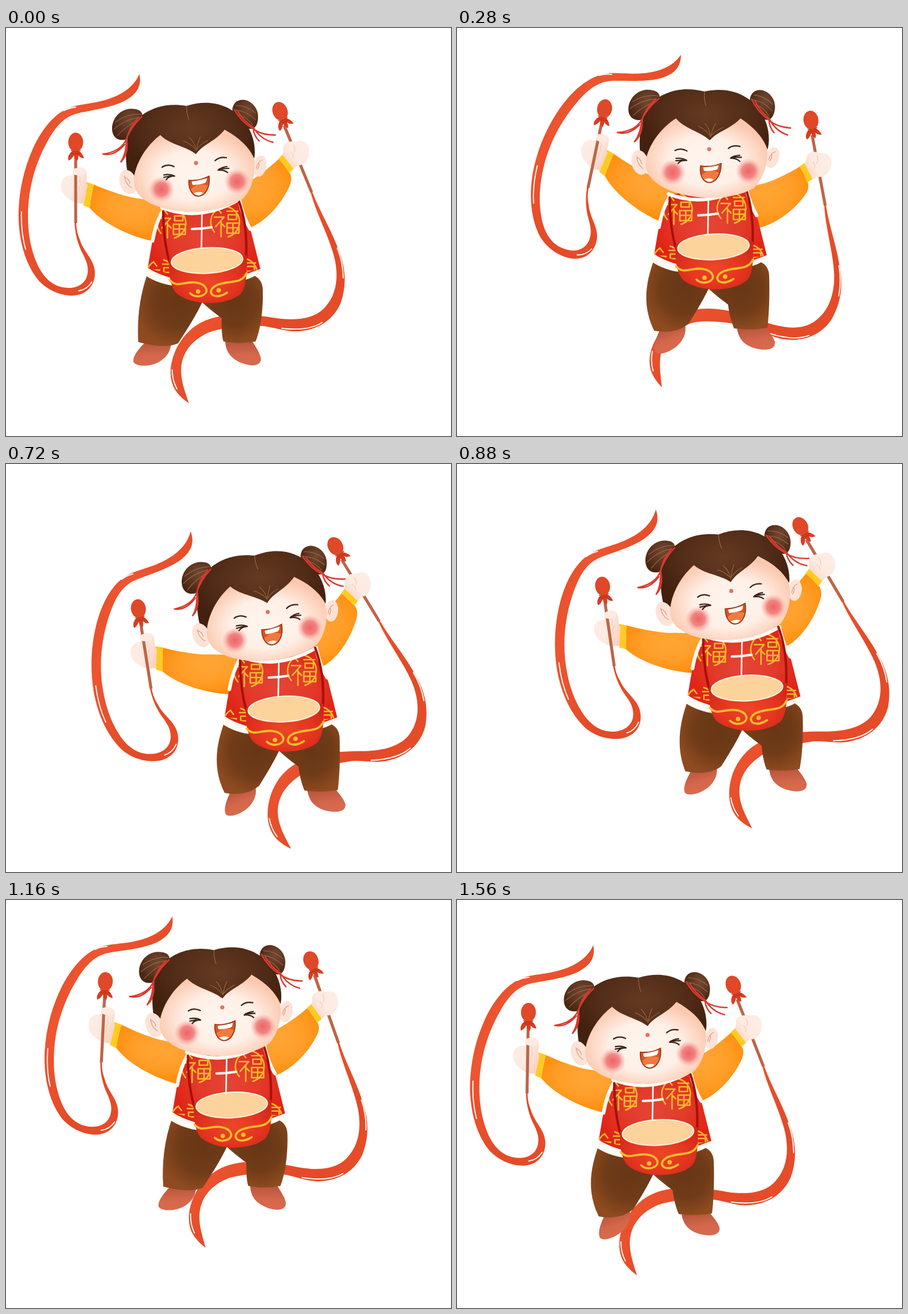
These frames come from a looping animation (747x686 px, 1600 ms). An HTML page:

```html
<!DOCTYPE html>
<html lang="zh">
<head>
<meta charset="utf-8">
<title>Drum dance</title>
<style>
html,body{margin:0;width:100%;height:100%;overflow:hidden;background:#fff}
svg{display:block;width:100%;height:100%}
.line{fill:none;stroke-linecap:round;stroke-linejoin:round}
.gold{stroke:#f6b62c;stroke-width:2.6}
.shine{stroke:#fff;stroke-width:1.8}
.bow{stroke:#d93a2e;stroke-width:2.4}
.strand{stroke:#a06c46;stroke-width:1}
.ink{stroke:#3d2013;stroke-width:2.2}
.trim{stroke:#fffaf3;stroke-width:6}
</style>
</head>
<body>
<svg viewBox="0 0 747 686" xmlns="http://www.w3.org/2000/svg">
<defs>
  <linearGradient id="ribbon" x1="0" y1="0" x2="1" y2="1">
    <stop offset="0" stop-color="#dd4524"/><stop offset=".3" stop-color="#ee5530"/>
    <stop offset=".6" stop-color="#e34a27"/><stop offset="1" stop-color="#ea4f2b"/>
  </linearGradient>
  <radialGradient id="sleeve" cx=".5" cy=".4" r=".6">
    <stop offset="0" stop-color="#ffa535"/><stop offset=".5" stop-color="#ff9f2a"/><stop offset="1" stop-color="#ff8c0a"/>
  </radialGradient>
  <linearGradient id="hand" x1="0" y1="0" x2="1" y2=".6">
    <stop offset="0" stop-color="#fdeee7"/><stop offset=".6" stop-color="#fdeae1"/><stop offset="1" stop-color="#f8d3c2"/>
  </linearGradient>
  <linearGradient id="hand2" href="#hand" x1="1" y1="0" x2="0" y2=".8"/>
  <radialGradient id="pants" cx=".55" cy=".4" r=".62">
    <stop offset="0" stop-color="#673716"/><stop offset=".55" stop-color="#6f3b18"/><stop offset="1" stop-color="#8f4b1f"/>
  </radialGradient>
  <linearGradient id="shoe" x1="0" y1="0" x2="0" y2="1">
    <stop offset="0" stop-color="#b4543c"/><stop offset=".6" stop-color="#d4674b"/><stop offset="1" stop-color="#d96a4c"/>
  </linearGradient>
  <radialGradient id="coat" cx=".5" cy=".5" r=".5">
    <stop offset="0" stop-color="#e64435"/><stop offset=".55" stop-color="#e23a2b"/><stop offset="1" stop-color="#e02517"/>
  </radialGradient>
  <radialGradient id="drum" cx=".5" cy=".55" r=".6">
    <stop offset="0" stop-color="#ec4727"/><stop offset=".6" stop-color="#e43520"/><stop offset="1" stop-color="#d3271a"/>
  </radialGradient>
  <radialGradient id="face" cx=".5" cy=".55" r=".54">
    <stop offset="0" stop-color="#fff5ee"/><stop offset=".55" stop-color="#fff0e7"/><stop offset="1" stop-color="#fbc8ae"/>
  </radialGradient>
  <radialGradient id="hair" cx=".5" cy=".3" r=".55">
    <stop offset="0" stop-color="#653a22"/><stop offset=".6" stop-color="#532d18"/><stop offset="1" stop-color="#43210f"/>
  </radialGradient>
  <radialGradient id="bun" cx=".6" cy=".35" r=".65">
    <stop offset="0" stop-color="#744932"/><stop offset="1" stop-color="#4a2614"/>
  </radialGradient>
  <radialGradient id="blush">
    <stop offset="0" stop-color="#ec6466"/><stop offset=".5" stop-color="#f07a78" stop-opacity=".9"/><stop offset="1" stop-color="#f8b0a4" stop-opacity="0"/>
  </radialGradient>
  <clipPath id="coatClip"><path d="M262 303L246 356L238 403Q320 432 427 405L412 345L392 288Z"/></clipPath>
  <g id="luck" class="line gold">
    <path d="M3 -25A26 26 0 0 1 3 25M-14 -22A26 26 0 0 0 -20 17M-13 -20l4 5M-20 -8H-4L-18 8M-9 -1V25M-8 3l5 5M1 -18H19M3 -12H17V-4H3ZM1 2H21V19H1ZM11 2V19M1 10H21"/>
  </g>
  <g id="knob">
    <path d="M-6 15C-12 20 -14 26 -12 31Q-7 29 -3 22Q-1 30 3 31Q5 25 4 22Q8 27 14 27Q12 20 6 15Z" fill="#d63e22"/>
    <ellipse rx="12.5" ry="16" fill="#df4828"/>
    <path class="line" d="M-8 14Q0 18 8 14M-8 18Q0 21 8 18" stroke="#b92f18" stroke-width="1.2"/>
  </g>
</defs>
<g id="figure">
  <g id="arms">
    <g fill="url(#ribbon)">
      <path d="M224 77C214 101 190 117 150 125C132 128 126 129 116 131C86 138 62 166 45 203C30 237 21 275 21 318C22 362 34 400 56 426C74 444 95 450 112 450C138 449 151 430 149 408C147 388 130 376 124 356C119 344 118 336 118 326L115 326C116 344 119 358 126 374C133 388 139 398 137 412C135 428 122 437 106 437C82 437 64 423 52 396C40 368 36 340 37 305C39 262 52 222 70 190C82 168 95 152 115 145C135 139 170 136 196 124C220 112 228 98 224 77Z"/>
      <path d="M511 275C520 310 542 350 551 385C559 418 555 448 536 469C518 490 485 492 455 488C430 484 400 480 372 483C330 487 305 505 288 535C274 562 272 590 285 610C292 620 300 626 307 631C300 610 293 592 294 572C296 545 312 525 340 512C365 503 395 501 430 501C455 504 470 511 490 510C525 508 550 490 562 462C572 432 570 405 560 378C548 342 527 310 514 275Z"/>
    </g>
    <path class="line shine" d="M97 139Q106 134 117 133M26 309Q25 345 33 372M122 442Q136 440 144 427M556 370Q566 395 566 420M463 505Q508 510 531 495M279 575Q279 592 287 607"/>
    <path d="M147 263C175 275 205 285 225 287L300 300L300 355L245 358C215 352 165 332 140 302Z" fill="url(#sleeve)"/>
    <path d="M135 259L148 263Q142 282 141 303L130 298Z" fill="#ffcb1f"/>
    <path d="M113 236C122 232 134 234 135 244C137 254 132 260 137 264L131 295C120 296 108 291 103 285C93 279 90 266 94 257C97 249 106 247 112 248Z" fill="url(#hand)"/>
    <path d="M117 206V328" stroke="#bd6547" stroke-width="5"/>
    <path d="M113 237Q124 232 132 239L133 246Q123 250 113 246Z" fill="#fdebe2"/>
    <path class="line" d="M122 249Q127 252 123 257Q128 262 122 267Q125 272 121 277" stroke="#f1c6b3" stroke-width="1"/>
    <use href="#knob" x="117" y="192"/>
    <path d="M459 219C440 237 420 252 405 260L340 290L360 340L412 335C440 322 465 292 477 263C480 255 479 248 476 243Z" fill="url(#sleeve)"/>
    <path d="M457 220L465 212Q475 223 483 237L475 244Q467 230 457 220Z" fill="#ffcb1f"/>
    <path d="M467 164L513 276" stroke="#bd6547" stroke-width="5"/>
    <path d="M469 194C478 188 487 192 492 190C503 188 510 199 509 211C508 224 499 231 490 231L483 237L464 213C468 207 462 200 469 194Z" fill="url(#hand2)"/>
    <path class="line" d="M482 196Q487 203 484 209M478 208Q484 213 482 218" stroke="#f1c6b3" stroke-width="1"/>
    <use href="#knob" transform="translate(460 140) rotate(-21)"/>
  </g>
  <g fill="url(#shoe)">
    <path id="shoeL" d="M236 526C222 540 212 552 214 562C222 572 250 568 262 558C270 552 276 545 278 526Z"/>
    <path id="shoeR" d="M368 524C368 545 378 556 395 563C410 569 428 570 428 556C426 545 418 535 412 524Z"/>
  </g>
  <g fill="url(#pants)"><path id="pantsL"/><path id="pantsR"/></g>
  <path d="M238 403L234 416Q254 430 285 434L400 424Q418 419 428 409L426 402Z" fill="#fffaf3"/>
  <path d="M262 303L246 356L238 403Q250 412 276 420L400 415L427 405L412 345L392 288Z" fill="url(#coat)"/>
  <g clip-path="url(#coatClip)">
    <use href="#luck" x="280" y="328"/>
    <use href="#luck" x="370" y="326"/>
    <use href="#luck" x="262" y="415"/>
    <use href="#luck" x="400" y="413"/>
  </g>
  <path class="line trim" d="M264 306Q251 328 246 358M392 290Q398 318 410 338"/>
  <path class="line trim" d="M262 302Q325 327 392 288" stroke-width="9"/>
  <path class="line" d="M329 312L328 370" stroke="#fffaf3" stroke-width="2.6"/>
  <path class="line" d="M312 338Q328 338 345 335" stroke="#fffaf3" stroke-width="4"/>
  <path class="line" d="M264 308C264 345 268 372 275 395M390 288C400 315 405 350 403 386" stroke="#a90f0c" stroke-width="4"/>
  <path d="M274 388C273 412 275 432 285 445C310 468 370 468 394 447C404 435 405 410 404 382Z" fill="url(#drum)"/>
  <ellipse cx="337.500" cy="391" rx="60" ry="21.500" transform="rotate(-3 337 391)" fill="#fdd39c" stroke="#fff3df" stroke-width="2"/>
  <path class="line" d="M275 424C287 438 300 425 319 428C338 431 341 444 331 449C323 453 314 451 309 446M404 412C396 430 378 425 361 430C344 434 341 444 347 449C354 453 364 450 371 445" stroke="#fbbd2a" stroke-width="3.6"/>
  <g fill="#fbbd2a"><circle cx="322.500" cy="443" r="3.8"/><circle cx="357" cy="441" r="3.8"/></g>
  <g id="head">
    <path d="M178 169C178 153 190 138 207 136C220 135 229 139 229 148C228 166 215 185 199 188C186 190 178 182 178 169Z" fill="url(#bun)"/>
    <path d="M380 137C381 126 389 119 401 121C415 124 425 138 423 153C422 166 415 172 407 169C394 164 381 150 380 137Z" fill="url(#bun)"/>
    <path class="line strand" d="M184 158Q205 143 226 145M181 170Q200 153 225 150M187 181Q202 164 222 155M386 130Q404 130 419 143M385 138Q403 139 419 154M390 146Q404 149 414 163"/>
    <path d="M204 243C199 215 200 184 214 160C232 138 264 124 303 131C340 119 374 128 397 153C413 172 420 196 417 218L380 270L230 270Z" fill="url(#hair)"/>
    <ellipse cx="205" cy="259" rx="14" ry="21" transform="rotate(-18 205 259)" fill="#fde3d6"/>
    <ellipse cx="426" cy="232" rx="11" ry="18" transform="rotate(10 426 232)" fill="#fde3d6"/>
    <path class="line" d="M199 249Q200 262 211 269M200 251Q207 254 208 261M430 222Q423 224 420 236M424 226Q426 231 422 238" stroke="#e5a088" stroke-width="1.3"/>
    <path d="M215 250C220 222 238 196 259 180C275 196 300 198 319 212C332 194 350 192 367 171C392 185 407 199 416 218C420 243 414 268 399 286C375 303 340 309 310 309C272 308 238 299 222 279C214 268 214 260 215 250Z" fill="url(#face)"/>
    <path class="line strand" d="M319 206Q318 194 308 184M317 203Q311 195 298 190M320 205Q321 194 326 183M321 203Q328 194 339 189M303 131Q303 144 307 154"/>
    <circle cx="261" cy="271" r="22" fill="url(#blush)"/>
    <circle cx="388" cy="258" r="22" fill="url(#blush)"/>
    <path class="line ink" d="M262 234Q271 228 282 233M351 223Q358 216 370 218M265 247Q276 245 283 249Q273 249 269 255M265 251L276 249M371 233Q362 234 356 239Q366 238 372 243M358 237L374 236"/>
    <circle cx="319" cy="227" r="3.4" fill="#ee6d5a"/>
    <path d="M307 256C320 257 332 254 341 249C343 268 335 283 322 283C312 282 306 270 307 256Z" fill="#d9521f" stroke="#963016" stroke-width="1.5"/>
    <path d="M310 271Q322 258 339 265Q334 282 322 282Q313 280 310 271Z" fill="#f07a3f"/>
    <path d="M312 258Q327 256 337 252.500Q337 260 333 261Q323 264 314 264Q312 263 312 258ZM315 278Q323 274 331 277Q327 282 322 281.500Q318 281 315 278Z" fill="#fff"/>
    <path class="line bow" d="M228 149Q209 167 200 191Q190 208 163 212Q182 216 199 196M223 150Q206 168 202 189Q202 211 193 225Q205 214 203 191M383 137Q395 158 414 169Q428 180 452 180M389 140Q398 156 415 167Q427 187 448 192M415 169Q416 181 425 190"/>
  </g>
</g>
</svg>
<script>
const LOOP = 1600, STEP = 40;
const $ = id => document.getElementById(id);

// each track: [time, value] pairs; step is 0 for feet apart, 1 for feet swung right
const tracks = {
  x: [[0,337],[280,430],[440,439],[560,443],[720,466],[840,489],[1000,459],[1120,398],[1240,347],[1360,330],[1560,337],[1600,337]],
  y: [[0,391],[180,345],[280,368],[360,378],[440,380],[560,396],[720,412],[840,390],[1000,332],[1060,325],[1120,334],[1360,404],[1560,391],[1600,391]],
  swing: [[0,0],[280,11.8],[440,3],[720,-9],[840,-9],[1000,-2.6],[1120,1],[1360,11.7],[1560,1],[1600,0]],
  step: [[0,0],[280,1],[450,.1],[720,1],[1000,.45],[1200,0],[1360,0],[1560,1],[1600,1]]
};

// monotone cubic through the keys, flat at both ends
function sample(keys, t) {
  const slope = i => (keys[i + 1][1] - keys[i][1]) / (keys[i + 1][0] - keys[i][0]);
  const tangent = i => {
    if (i === 0 || i === keys.length - 1) return 0;
    const a = slope(i - 1), b = slope(i);
    return a * b <= 0 ? 0 : 2 * a * b / (a + b);
  };
  let i = 0;
  while (i < keys.length - 2 && t >= keys[i + 1][0]) i++;
  const [t0, v0] = keys[i], [t1, v1] = keys[i + 1];
  const h = t1 - t0, u = (t - t0) / h, w = 1 - u;
  return v0 * (1 + 2 * u) * w * w + v1 * u * u * (3 - 2 * u)
    + h * u * w * (tangent(i) * w - tangent(i + 1) * u);
}

const put = (id, transform) => $(id).setAttribute('transform', transform);

// the hips stay still while hems and shoes swing
function drawLegs(k) {
  $('pantsL').setAttribute('d', `M238 412C224 450 ${220 - 3 * k} 490 ${222 + 16 * k} ${528 + 4 * k}
    C${250 + 12 * k} 536 ${275 + 5 * k} ${537 - 4 * k} ${289 + 7 * k} ${530 - 10 * k}C305 505 318 485 329 462L345 415Z`);
  $('pantsR').setAttribute('d', `M326 458C340 472 352 480 362 488C${362 + 2 * k} 505 ${362 + 6 * k} 518 ${365 + 7 * k} ${527 + k}
    C${385 + 8 * k} 531 ${405 + 8 * k} 530 ${419 + 9 * k} 527C${428 + 3 * k} 505 432 470 431 440C431 428 425 420 416 416L330 415Z`);
  put('shoeL', `translate(${13 * k} ${-6 * k}) rotate(${-20 * k} 257 530)`);
  put('shoeR', `translate(${9 * k} 0) rotate(${-8 * k} 390 527)`);
}

function draw(ms) {
  const t = Math.floor(ms % LOOP / STEP) * STEP;
  const swing = sample(tracks.swing, t);
  put('figure', `translate(${sample(tracks.x, t) - 337} ${sample(tracks.y, t) - 391})`);
  put('arms', `rotate(${swing} 297 358)`);
  put('head', `rotate(${swing * .41} 327 361)`);
  drawLegs(sample(tracks.step, t));
}

let start;
function tick(now) {
  start ??= now;
  draw(now - start);
  requestAnimationFrame(tick);
}
draw(0);
requestAnimationFrame(tick);
</script>
</body>
</html>
```
